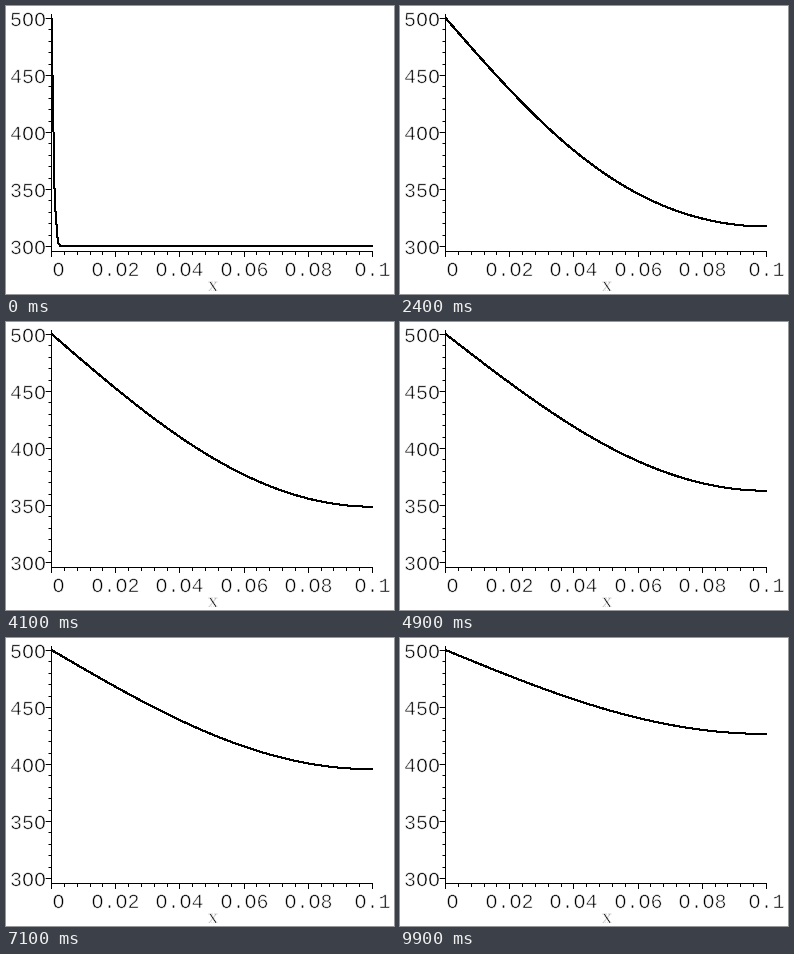
A matplotlib script for the animation above (10 s loop, 388x288 px).

```python
import numpy as np
import matplotlib.pyplot as plt
from matplotlib.animation import FuncAnimation
from matplotlib.patheffects import Stroke

W, H, DPI = 388, 288, 100
PX = 72 / DPI                      # one pixel in points
FRAMES, INTERVAL = 100, 100
X0, X1, LENGTH = 45.5, 366.5, 0.1
Y500, Y300, BASE = 12, 240, 245.5
TAU0, RATE, TERMS = 7.5e-5, 0.01253, 100

fig = plt.figure(figsize=(W / DPI, H / DPI), dpi=DPI, facecolor="white")
ax = fig.add_axes([0, 0, 1, 1])
ax.set(xlim=(0, W), ylim=(H, 0))
ax.axis("off")


def to_x(x):
    return X0 + (X1 - X0) * x / LENGTH


def to_y(temp):
    return Y500 + (500 - temp) / 200 * (Y300 - Y500)


def stroke(xs, ys, smooth=True):
    return ax.plot(xs, ys, color="black", lw=PX, antialiased=smooth,
                   snap=False, solid_capstyle="butt")[0]


def write(text, x, baseline, ha="center", family="Liberation Mono"):
    # The letter O stands in for the font's dotted zero;
    # a white outline thins the strokes to typewriter weight.
    ax.text(x, baseline, text.replace("0", "O"), family=family,
            fontsize=20 * PX, ha=ha, va="baseline",
            path_effects=[Stroke(linewidth=0.6 * PX, foreground="white")])


def draw_axes():
    stroke([X0, X0], [8, BASE])
    stroke([X0 - 0.5, X1 + 0.5], [BASE, BASE])
    for i in range(21):
        temp = 300 + 10 * i
        y = round(to_y(temp)) + 0.5
        stroke([X0 - (3 if i % 5 else 6), X0], [y, y])
        if i % 5 == 0:
            write(str(temp), 4, y + 7.5, ha="left")
    for i in range(26):
        pos = 0.004 * i
        x = np.floor(to_x(pos)) + 0.5
        stroke([x, x], [BASE, BASE + (3.5 if i % 5 else 5.5)])
        if i % 5 == 0:
            write(f"{pos:g}", max(x, X0 + 7), 270)
    write("x", 207, 285, family="Liberation Serif")


draw_axes()

# Rod heated at one end and insulated at the other: Fourier series solution.
x = np.linspace(0, LENGTH, 101)
odd = 2 * np.arange(TERMS) + 1
modes = np.sin(np.outer(x, odd) * np.pi / (2 * LENGTH)) / odd
curve = stroke(to_x(x), to_y(np.full_like(x, 300)), smooth=False)


def update(frame):
    decay = np.exp(-odd ** 2 * (TAU0 + RATE * frame))
    curve.set_ydata(to_y(500 - 800 / np.pi * modes @ decay))
    return [curve]


anim = FuncAnimation(fig, update, frames=FRAMES, interval=INTERVAL,
                     repeat=True, repeat_delay=0)
plt.show()
```
